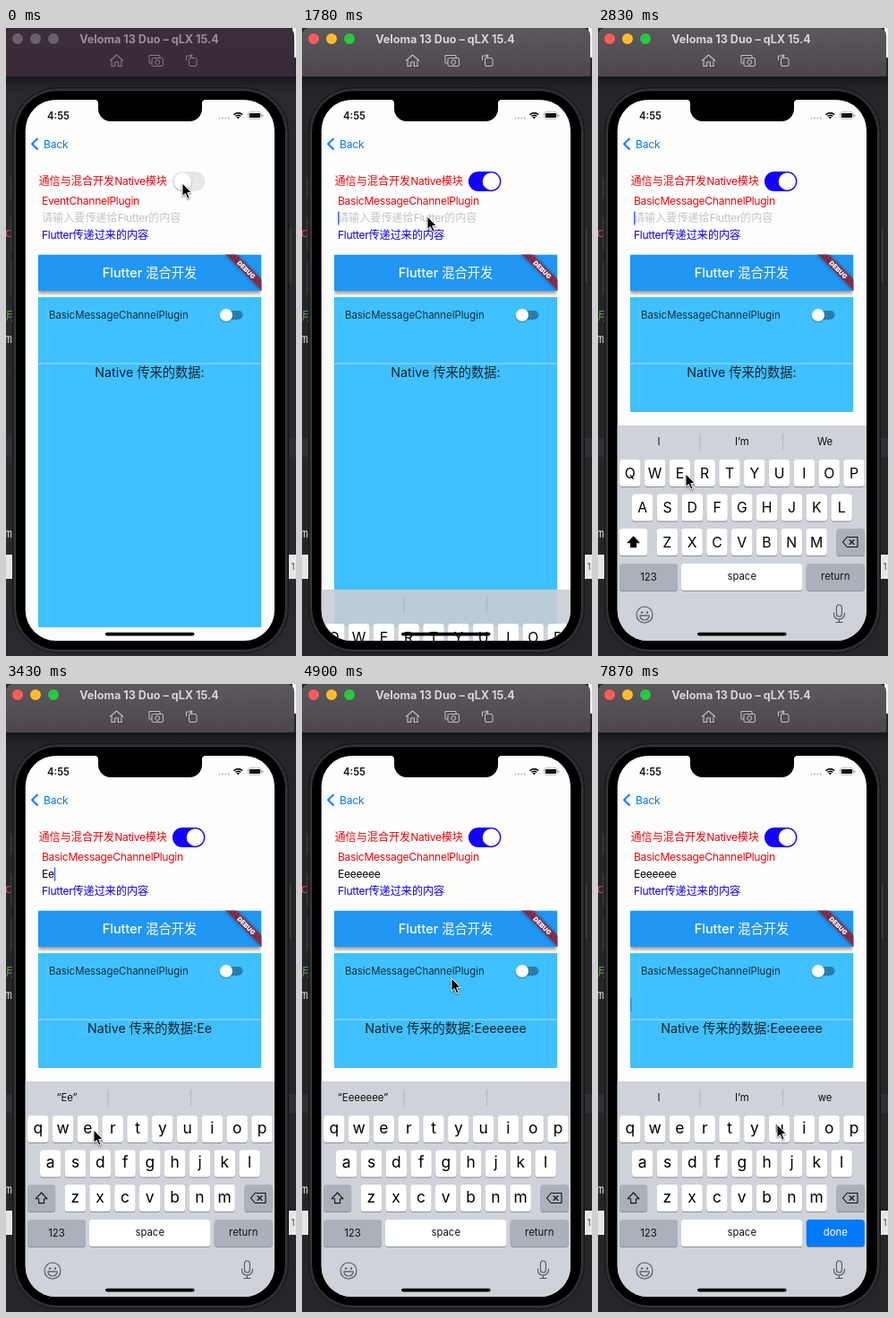
Write an HTML page with a canvas that moves like this. It is 324 by 700 pixels and loops after 8000 ms.

```html
<!DOCTYPE html>
<html lang="zh">
<head>
<meta charset="utf-8">
<title>Message channel demo</title>
<style>
html, body { margin: 0; width: 100%; height: 100%; overflow: hidden; background: #222327; }
canvas { display: block; width: 324px; height: 700px; }
</style>
</head>
<body>
<canvas id="stage"></canvas>
<script>
const W = 324, H = 700, LOOP = 8000, STEP = 148.5;
const FONT = 'Inter, "Noto Sans CJK SC", "Noto Sans CJK", sans-serif';
const RED = '#fb0007', BLUE = '#0d00f5', TINT = '#007aff';
const VIEW = { x: 36, w: 249.4 };
const canvas = document.getElementById('stage');
const dpr = window.devicePixelRatio || 1;
canvas.width = W * dpr;
canvas.height = H * dpr;
const g = canvas.getContext('2d');

const clamp = v => Math.max(0, Math.min(1, v));
const within = (t, spans) => spans.some(([a, b]) => t >= a && t < b);

function paint(fill, stroke, width) {
  if (fill) { g.fillStyle = fill; g.fill(); }
  if (stroke) { g.strokeStyle = stroke; g.lineWidth = width; g.stroke(); }
}

function rect(x, y, w, h, color) {
  g.fillStyle = color;
  g.fillRect(x, y, w, h);
}

function fade(y0, y1, from, to) {
  const grad = g.createLinearGradient(0, y0, 0, y1);
  grad.addColorStop(0, from);
  grad.addColorStop(1, to);
  return grad;
}

function round(x, y, w, h, r, fill, stroke, width = 1) {
  g.beginPath();
  g.roundRect(x, y, w, h, r);
  paint(fill, stroke, width);
}

function circle(x, y, r, fill, stroke, width = 1) {
  g.beginPath();
  g.arc(x, y, r, 0, Math.PI * 2);
  paint(fill, stroke, width);
}

// Points as a flat list x, y, x, y ...
function poly(pts, fill, stroke, width = 1, close = true) {
  g.beginPath();
  for (let i = 0; i < pts.length; i += 2) g.lineTo(pts[i], pts[i + 1]);
  if (close) g.closePath();
  paint(fill, stroke, width);
}

function shadow(dy, blur, color, draw) {
  g.save();
  g.shadowOffsetY = dy * dpr;
  g.shadowBlur = blur * dpr;
  g.shadowColor = color;
  draw();
  g.restore();
}

function clipped(x, y, w, h, r, draw) {
  g.save();
  g.beginPath();
  g.roundRect(x, y, w, h, r);
  g.clip();
  draw();
  g.restore();
}

// Tracking applies to Latin runs only; cy is the middle of the capitals.
function text(str, x, cy, size, color, { align = 'left', weight = 400, track = 0 } = {}) {
  g.font = `${weight} ${size}px ${FONT}`;
  g.fillStyle = color;
  const runs = str.match(/[\u3000-\u9fff]+|[^\u3000-\u9fff]+/g) || [];
  const setTrack = run => { g.letterSpacing = (run > '\u3000' ? 0 : track) + 'px'; };
  const widths = runs.map(run => { setTrack(run); return g.measureText(run).width; });
  if (align === 'center') x -= widths.reduce((a, b) => a + b, 0) / 2;
  runs.forEach((run, i) => {
    setTrack(run);
    g.fillText(run, x, cy + size * 0.364);
    x += widths[i];
  });
  g.letterSpacing = '0px';
  return x;
}

const label = (str, x, cy, color) => text(str, x, cy, 12.1, color, { track: -0.3 });
const center = (str, x, cy, size, color, weight) => text(str, x, cy, size, color, { align: 'center', weight });

function backdrop(active) {
  const base = active ? '#25262a' : '#292a2e';
  rect(0, 0, W, H, base);
  rect(0, 54, W, 16, fade(54, 70, '#17181b', base));
  rect(320, 0, 4, 33, '#f4f4f4');
  rect(0, 457, W, 21, '#303136');
  rect(0, 587, W, 27, '#e6e6e8');
  g.font = '14px "Noto Sans Mono", monospace';
  [['m', 351, '#c8c9cd'], ['m', 568, '#c8c9cd'], ['c', 233, '#c75450'], ['月', 326, '#5f9a57']]
    .forEach(([s, y, color]) => { g.fillStyle = color; g.fillText(s, -1.5, y); });
  text('1', 318.5, 600, 10, '#55555a');
}

function titleBar(active) {
  const bar = active ? fade(0, 54, '#5d585e', '#4c464d') : fade(0, 54, '#3d2e3d', '#392a39');
  round(0, 0, 322, 54, [8, 8, 0, 0], bar);
  const dots = active ? ['#fc5b57', '#fdbc2e', '#28c840'] : Array(3).fill('#6c606c');
  dots.forEach((color, i) => circle(13 + 20 * i, 12, 6, color));
  center('Veloma 13 Duo – qLX 15.4', 160, 12, 12.6, active ? '#d9d4d9' : '#998e99', 700);
  const c = active ? '#c5bfc5' : '#857a86';
  poly([116, 36.5, 123.5, 30, 131, 36.5], null, c, 1.1, false);
  poly([118, 35.5, 118, 42.5, 121.6, 42.5, 121.6, 38, 125.4, 38, 125.4, 42.5, 129, 42.5, 129, 35.5], null, c, 1.1, false);
  poly([163, 39, 160, 39, 160, 30.5, 172, 30.5, 172, 33], null, c, 1, false);
  round(163, 33.5, 12.5, 9, 1.5, null, c);
  circle(169.2, 38, 2.5, null, c);
  round(204.5, 33.5, 8.5, 9, 1.5, null, c);
  poly([201.5, 36, 201.5, 31, 207, 31], null, c, 1, false);
  poly([206, 28.8, 209, 31, 206, 33.2], c);
}

function phoneBody() {
  [[5, 167, 23], [5, 211, 37], [5, 260, 37], [315, 224, 60]]
    .forEach(([x, y, h]) => round(x, y, 4, h, 1.5, '#343437'));
  round(7.5, 66.5, 308, 630, 50, '#2b2b2e', '#141416');
  round(10.5, 69.5, 302, 624, 47, '#000', '#3f3f42');
}

function statusBar() {
  text('4:55', 46, 98, 11.3, '#111', { weight: 600 });
  for (let i = 0; i < 4; i++) circle(238.5 + i * 3.4, 100.3, 1.1, '#bdbdbf');
  [6.6, 3.9].forEach(r => {
    g.beginPath();
    g.arc(259.3, 101.2, r, -Math.PI * 0.76, -Math.PI * 0.24);
    paint(null, '#111', 1.7);
  });
  poly([257.5, 99.6, 259.3, 98.8, 261.1, 99.6, 259.3, 101.6], '#111');
  round(270.5, 93.7, 15, 7.6, 2.3, null, '#aaa', 0.8);
  round(271.8, 95, 12.4, 5, 1.2, '#111');
  round(286.3, 96.2, 1.2, 2.7, 0.6, '#999');
}

function nativePart(t, typed) {
  g.lineJoin = g.lineCap = 'round';
  poly([35, 123.5, 29, 129.2, 35, 135], null, TINT, 1.9, false);
  text('Back', 42, 129.2, 12.1, TINT, { track: -0.2 });
  label('通信与混合开发Native模块', 36.5, 171, RED);

  const on = clamp((t - 520) / 300);
  const mix = (a, b) => Math.round(a + (b - a) * on);
  round(186, 160, 36.4, 22, 11, `rgb(${mix(231, 20)},${mix(231, 0)},${mix(233, 255)})`);
  shadow(1.5, 3, 'rgba(0,0,0,.2)', () => circle(197.2 + 14.2 * on, 171, 9.7, '#fff'));

  label(t < 700 ? 'EventChannelPlugin' : 'BasicMessageChannelPlugin', 40, 193, RED);
  const end = typed ? label(typed, 40, 212, '#000') : 40;
  if (!typed) label('请输入要传递给Flutter的内容', 40, 212, '#c4c4c6');
  if (within(t, [[1770, 2300], [2815, 4740], [5190, 5780]])) rect(end, 204.5, 1.5, 15, '#3a66f0');
  label('Flutter传递过来的内容', 40, 231, BLUE);
}

function debugRibbon() {
  clipped(VIEW.x, 252.5, VIEW.w, 40.5, 0, () => {
    g.translate(VIEW.x + VIEW.w, 252.5);
    g.rotate(Math.PI / 4);
    shadow(0, 4, 'rgba(0,0,0,.5)', () => rect(-40, 19.6, 80, 8.6, 'rgba(150,36,58,.82)'));
    center('DEBUG', 0, 23.9, 7.2, '#fff', 900);
  });
}

function flutterPart(t, bottom, typed) {
  const { x, w } = VIEW;
  // The bar's shadow only falls inside its own view.
  clipped(x, 252.5, w, bottom - 252.5, 0, () => {
    shadow(2.5, 3.5, 'rgba(0,0,0,.4)', () => rect(x, 252.5, w, 40.5, '#2196f3'));
    rect(x, 300, w, bottom - 300, '#40c0ff');
  });
  text('Flutter 混合开发', 160.5, 272.7, 14.26, '#fff', { align: 'center', weight: 500, track: 0.1 });
  debugRibbon();
  rect(x, 373.6, w, 1, '#a9dcf5');
  text('BasicMessageChannelPlugin', 48, 320, 11.4, '#17303f');
  round(240, 315, 24.5, 10, 5, '#2a7fa8');
  shadow(1, 2, 'rgba(0,0,0,.35)', () => circle(246, 320, 7.1, '#fdfdfd'));
  center('Native 传来的数据:' + typed, 160.5, 384, 14.26, '#14232c');
  if (within(t, [[5780, 6230], [6670, 7420], [7715, LOOP]])) rect(x, 350, 1.3, 15, '#2d86c4');
}

function key(x, y, w, fill) {
  round(x, y + 1, w, 30, 3.6, '#8b8e94');
  round(x, y, w, 30, 3.6, fill);
}

function keyRow(letters, x, y, caps) {
  [...letters].forEach((ch, i) => {
    const left = x + i * 27.8;
    key(left, y, 23.4, '#fff');
    center(caps ? ch.toUpperCase() : ch, left + 11.7, y + (caps ? 15 : 13.6), caps ? 15.8 : 17.4, '#000');
  });
}

function shiftIcon(x, y, solid) {
  poly([x, y - 6, x + 6.5, y + 0.8, x + 3, y + 0.8, x + 3, y + 5.6, x - 3, y + 5.6, x - 3, y + 0.8, x - 6.5, y + 0.8],
    solid ? '#000' : null, '#111', 1.1);
}

function eraseIcon(x, y) {
  poly([x - 8.5, y, x - 3.8, y - 5.5, x + 8, y - 5.5, x + 8, y + 5.5, x - 3.8, y + 5.5], null, '#111', 1.1);
  poly([x - 1, y - 2.5, x + 4, y + 2.5], null, '#111', 1.1);
  poly([x - 1, y + 2.5, x + 4, y - 2.5], null, '#111', 1.1);
}

function smiley(x, y) {
  const c = '#54575c';
  circle(x, y, 9, null, c, 1.2);
  circle(x - 3, y - 2.6, 1.2, c);
  circle(x + 3, y - 2.6, 1.2, c);
  g.beginPath();
  g.arc(x, y + 0.8, 5.2, 0, Math.PI);
  g.closePath();
  g.stroke();
}

function mic(x, y) {
  const c = '#54575c';
  round(x - 3, y - 10, 6, 13, 3, null, c, 1.1);
  g.beginPath();
  g.moveTo(x - 6, y - 1);
  g.arc(x, y, 6, Math.PI, 0, true);
  g.lineTo(x + 6, y - 1);
  g.stroke();
  poly([x, y + 6, x, y + 9.5], null, c, 1.1);
  poly([x - 3.5, y + 9.5, x + 3.5, y + 9.5], null, c, 1.1);
}

function hints(t, typed) {
  if (t < 2000) return [];
  if (t >= 5780) return ['I', 'I’m', 'we'];
  if (!typed) return ['I', 'I’m', 'We'];
  const shown = t < 3400 ? 1 : t < 3712 ? 2 : t < 4590 ? 3 : 7;
  return [`“${typed.slice(0, shown)}”`];
}

function keyboard(t, rise, typed) {
  if (rise <= 0) return;
  const caps = !typed, done = t >= 5780, grey = '#abb1bb';
  g.save();
  g.translate(0, 240 * (1 - rise));
  rect(21, 443, 280, 245, 'rgba(201,206,213,.9)');
  [114, 206.5].forEach(x => rect(x - 0.5, 452, 1, 18, 'rgba(120,130,145,.35)'));
  hints(t, typed).forEach((s, i) => center(s, 68 + 92.8 * i, 461, 11.4, '#111'));
  keyRow('qwertyuiop', 24.1, 481, caps);
  keyRow('asdfghjkl', 38, 519.5, caps);
  keyRow('zxcvbnm', 65.6, 558, caps);
  key(24.1, 558, 31, caps ? '#fff' : grey);
  shiftIcon(39.6, 573, caps);
  key(266.5, 558, 31.2, grey);
  eraseIcon(282, 573);
  key(24.1, 597, 64.8, grey);
  key(93, 597, 135.5, '#fff');
  key(232.8, 597, 65, done ? TINT : grey);
  center('123', 56.5, 611.5, 11.4, '#111');
  center('space', 160.7, 611.2, 11.4, '#111');
  center(done ? 'done' : 'return', 265.3, 611.2, 11.4, done ? '#fff' : '#111');
  smiley(52, 654);
  mic(269.4, 653);
  g.restore();
}

// Pointer path: time, x, y of the tip
const path = [
  [0, 197, 173], [1030, 197, 173], [1480, 140, 210], [1930, 140, 210], [2670, 100, 495],
  [2820, 98, 497], [4600, 98, 497], [4900, 167, 328], [5050, 183, 325], [5346, 150, 350],
  [5640, 150, 350], [5940, 129, 363], [6830, 129, 363], [6980, 96, 363], [7128, 129, 363],
  [7580, 129, 363], [7870, 200, 491], [8000, 200, 491]
];

function pointer(t) {
  const i = Math.max(1, path.findIndex(p => p[0] > t));
  const a = path[i - 1], b = path[i];
  const k = clamp((t - a[0]) / (b[0] - a[0]));
  const e = k * k * (3 - 2 * k);
  g.save();
  g.translate(a[1] + (b[1] - a[1]) * e, a[2] + (b[2] - a[2]) * e);
  g.lineJoin = 'miter';
  shadow(1, 2, 'rgba(0,0,0,.4)', () =>
    poly([0, 0, 0, 14.5, 3.3, 11.5, 5.9, 17.3, 8.2, 16.2, 5.7, 10.7, 10.2, 10.4], '#000', '#fff', 1));
  g.restore();
}

function notch() {
  g.beginPath();
  g.moveTo(99, 79);
  g.lineTo(99, 80);
  g.quadraticCurveTo(103, 80, 103, 84);
  g.arcTo(103, 104, 117, 104, 14);
  g.arcTo(219, 104, 219, 90, 14);
  g.lineTo(219, 84);
  g.quadraticCurveTo(219, 80, 223, 80);
  g.lineTo(223, 79);
  paint('#000');
}

function draw(t) {
  const active = t > 440;
  const rise = Math.sin(clamp((t - 1728.5) / 350) * Math.PI / 2);
  const count = t < 3118 ? 0 : Math.min(7, Math.floor((t - 3118) / 198) + 1);
  const typed = 'Eeeeeee'.slice(0, count);

  g.setTransform(dpr, 0, 0, dpr, 0, 0);
  g.lineCap = 'butt';
  backdrop(active);
  titleBar(active);
  phoneBody();
  clipped(21.7, 80, 278.3, 603, 34, () => {
    rect(21, 80, 280, 604, '#fdfdfd');
    statusBar();
    nativePart(t, typed);
    flutterPart(t, rise < 1 ? 668 : 428, typed);
    keyboard(t, rise, typed);
    round(111, 673.8, 99.5, 3.6, 1.8, '#000');
  });
  notch();
  pointer(t);
}

const start = performance.now();
function tick() {
  const t = (performance.now() - start) % LOOP;
  draw(Math.floor((t + 16) / 148.7) * STEP);
  requestAnimationFrame(tick);
}
tick();
</script>
</body>
</html>
```
